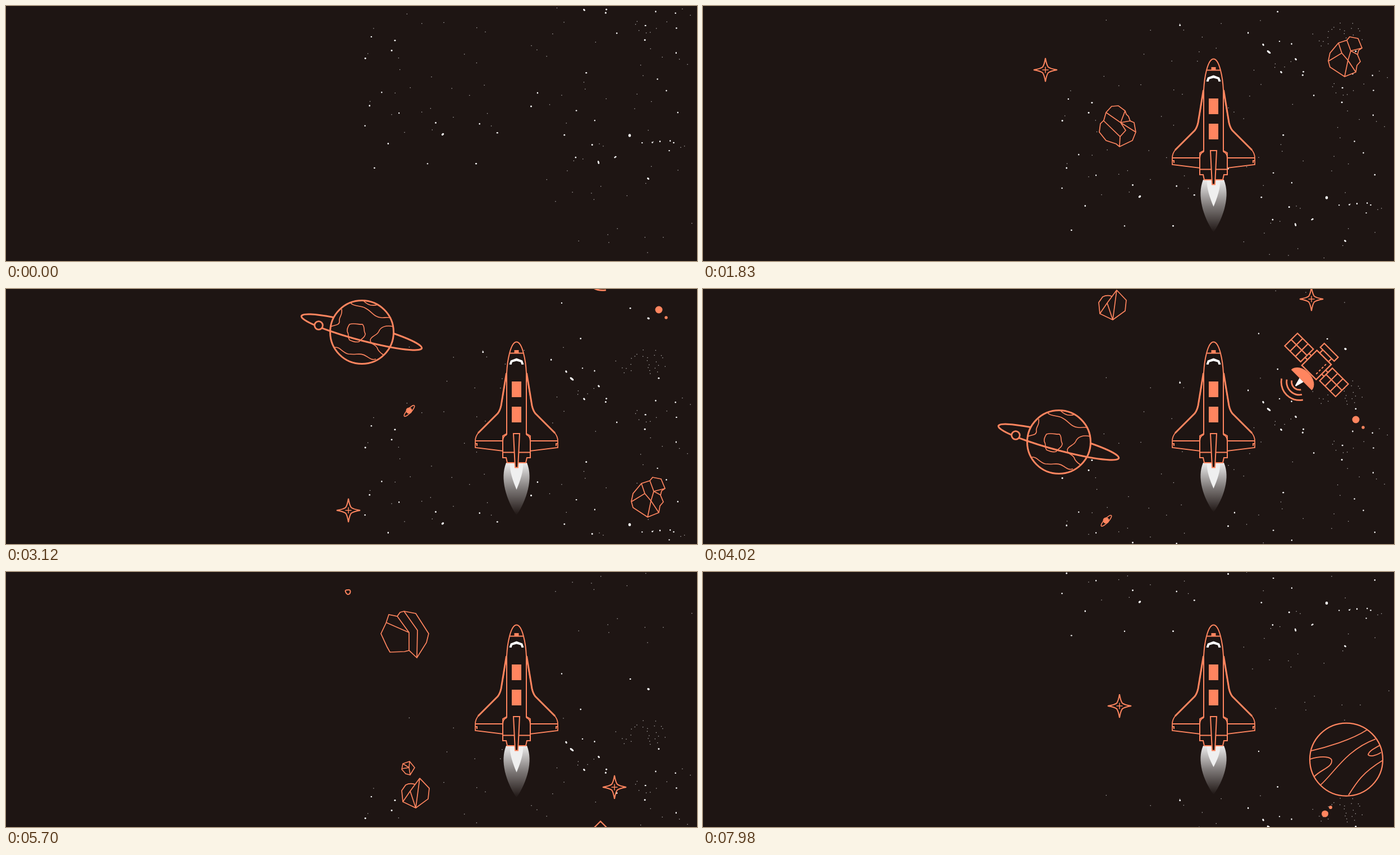
Animation of 1231 by 455 pixels, one loop 8 s. Source, as an HTML page with a canvas:

```html
<!DOCTYPE html>
<html lang="en">
<head>
<meta charset="utf-8">
<title>Shuttle flight</title>
<style>
html, body { margin: 0; width: 100%; height: 100%; overflow: hidden; background: #1e1513; }
canvas { display: block; }
</style>
</head>
<body>
<canvas id="stage" width="1231" height="455"></canvas>
<script>
const ctx = document.getElementById('stage').getContext('2d');
const W = 1231, H = 455, LOOP = 8000, STEP = 30;
const BG = '#1e1513', INK = '#ff855f';
const STAR_SPEED = 0.0607, SPEED = 0.2178, TILE = 660;
const TAU = Math.PI * 2, DEG = Math.PI / 180;

function seeded(seed) {
  return () => (seed = seed * 16807 % 2147483647) / 2147483647;
}

// Star regions of the scrolling tile
const rand = seeded(4217);
const stars = [];
function scatter(count, left, right, top, bottom, bright) {
  for (let i = 0; i < count; i++) {
    const x = left + (right - left) * rand();
    const y = top + (bottom - top) * rand();
    const w = bright ? 2.2 + rand() : 1.5;
    stars.push({ x, y, w, h: bright ? 2.2 + rand() : 1.5, turn: 0, alpha: bright ? 1 : .7 });
  }
}
scatter(26, 640, 900, 0, 245, false);
scatter(58, 930, 1225, 0, 440, false);
scatter(26, 1085, 1175, -82, -38, false);
scatter(16, 670, 1090, -100, 0, false);
scatter(15, 637, 885, 10, 310, true);
scatter(28, 930, 1222, 0, 275, true);
scatter(8, 820, 1225, -190, -5, true);

// The largest stars: x, y, width, height, angle
for (const [x, y, w, h, turn] of [
  [778, 229, 5, 3.5, -40], [1055.5, 279, 3, 6, -15], [1111, 231, 4.5, 5.5, 0],
  [1144, 308, 4.5, 3, 40], [1030, 7, 4.5, 3, 50], [998, -42, 4.5, 3, 60],
  [1008, -29, 8, 3.5, 40], [1056, -16, 4.5, 3, 50], [1144.5, -137, 4.5, 3.5, 20]
]) stars.push({ x, y, w, h, turn, alpha: 1 });

function starField(shift) {
  for (const { x, y, w, h, turn, alpha } of stars) {
    ctx.fillStyle = `rgba(255,255,255,${alpha})`;
    ctx.beginPath();
    ctx.ellipse(x, (y + shift + TILE + 10) % TILE - 10, w / 2, h / 2, turn * DEG, 0, TAU);
    ctx.fill();
  }
}

function line(d, width = 1.7, fill) {
  const path = new Path2D(d);
  if (fill) { ctx.fillStyle = fill; ctx.fill(path); }
  ctx.strokeStyle = INK;
  ctx.lineWidth = width;
  ctx.stroke(path);
}

function shape(d, fill) {
  ctx.fillStyle = fill;
  ctx.fill(new Path2D(d));
}

function disc(x, y, r, fill = INK) {
  ctx.fillStyle = fill;
  ctx.beginPath();
  ctx.arc(x, y, r, 0, TAU);
  ctx.fill();
}

function arc(x, y, rx, ry, width, turn = 0, from = 0, to = 360) {
  ctx.strokeStyle = INK;
  ctx.lineWidth = width;
  ctx.beginPath();
  ctx.ellipse(x, y, rx, ry, turn * DEG, from * DEG, to * DEG);
  ctx.stroke();
}

function sparkle(x, y) {
  ctx.save();
  ctx.translate(x, y);
  ctx.beginPath();
  for (let i = 0; i < 4; i++) {
    ctx.lineTo(0, -21);
    ctx.quadraticCurveTo(2, -9, 5, -5);
    ctx.quadraticCurveTo(9, -2, 21, 0);
    ctx.rotate(90 * DEG);
  }
  ctx.closePath();
  ctx.fillStyle = BG;
  ctx.fill();
  ctx.strokeStyle = INK;
  ctx.lineWidth = 2;
  ctx.stroke();
  line('M-5.5 0H5.5M0-5.5V5.5', 1.5);
  ctx.restore();
}

function firstRocks() {
  sparkle(610, 114);
  line('M728 179L740 178 752 187 754 193 758 197 761 205 768 208 771 225 765 240 742 251 736 246 718 240 706 225 708 210 714 204 718 190Z'
    + 'M718 190L744 208 753 222 743 233 714 205M743 233L742 251M752 187L744 208 761 205M744 208L771 225', 1.7, BG);
  line('M1152 55L1167 58 1174 75 1168 79 1166 87 1171 99 1165 106 1163 118 1143 126 1117 109 1114 98 1117 84 1132 66 1147 61Z'
    + 'M1132 66L1138 84 1115 98M1138 84L1149 97 1143 126M1163 118L1149 97 1154 80 1147 61M1174 75L1154 80 1167 87', 1.7, BG);
}

function ringedPlanet() {
  disc(634, 77, 56.5, BG);
  line('M598 36C600 48 592 50 594 58C594 65 586 64 579 67'
    + 'M614 25C620 32 632 29 640 34C652 40 655 50 668 51C675 52 680 49 686 52'
    + 'M637 21C645 30 655 30 662 28'
    + 'M612 63C620 60 630 64 635 63C640 68 636 73 640 80C640 87 633 88 629 94C622 96 616 93 612 91C608 86 612 82 608 76C607 70 610 66 612 63Z'
    + 'M690 67C676 64 667 68 664 76C661 83 650 84 649 91C649 100 660 98 662 107C665 113 669 115 673 118'
    + 'M585 104C596 103 598 113 610 116C625 118 632 113 642 120C650 125 652 127 659 125', 1.6);
  arc(634, 77, 56.5, 56.5, 3);
  arc(633.5, 77, 111, 14.5, 3, 15, -60, 240);
  disc(557, 65, 7.5, BG);
  arc(557, 65, 7.3, 7.3, 2.8);
  disc(718, 217, 5.5);
  arc(718.5, 217.5, 13, 3.6, 1.6, -47);
  disc(1163, 37, 6.5);
  disc(1176, 51, 2.7);
}

function satellite() {
  ctx.save();
  ctx.translate(1093, 135.5);
  ctx.rotate(45 * DEG);
  for (const x of [-64, 24])
    line(`M${x}-16h40v32h-40zM${x} 0h40M${x + 13.3}-16v32M${x + 26.6}-16v32`, 2.2, BG);
  line('M-18-19H18V19H-18Z', 2.4, BG);
  line('M-17.5-37h35v10h-35zM-11-27v8M11-27v8M-24-5h6M-24 5h6M18-5h6M18 5h6', 2.2);
  ctx.setLineDash([4, 3]);
  line('M11-13V13', 2);
  ctx.setLineDash([]);
  for (const r of [14, 23, 32.5]) arc(0, 43, r, r, 2.8, 0, 34, 146);
  shape('M-26 38A26 18 0 0 1 26 38Z', INK);
  shape('M-5 38H5L1 53H-1Z', '#fff');
  ctx.restore();
}

function middleGroup() {
  satellite();
  sparkle(1084, 18);
  line('M737 2L754 20 752 39 730 55 707 44 705 24 712 14Q720 10 728 13M707 44L720 25 737 2 730 55 720 25', 1.7, BG);
}

function lateRocks() {
  line('M709 70L730 74 753 110 749 126 732 153 718 140 710 142 684 143 679 134 668 110 677 91 682 76 697 79 702 72Z'
    + 'M677 90L718 108V140M697 79L718 108M709 70L733 104 732 153', 1.7, BG);
  line('M719 338L728 349 720 362 712 360 705 352 707 342ZM707 342L718 349 719 338M705 351L718 349 720 362', 1.6, BG);
  line('M604.5 34Q605 31.5 609 32Q613.5 31 613.5 35Q613 40 609 40Q606 39 604.5 34Z', 2);
}

function stripedPlanet() {
  sparkle(742, 30);
  disc(1146, 125.5, 65, BG);
  line('M1083 110C1110 104 1155 91 1184 72'
    + 'M1100 171C1124 150 1146 108 1198 89'
    + 'M1150 189C1165 165 1175 149 1211 127'
    + 'M1081 125C1100 119 1122 119 1120 129C1119 140 1100 144 1089 156'
    + 'M1206 100C1195 106 1186 111 1185 117C1188 121 1198 119 1208 113', 1.8);
  arc(1146, 125.5, 65, 65, 2.2);
  disc(1108, 222.5, 6);
  disc(1118, 211, 3);
}

// Each group is drawn as it stands at time "at"
const GROUPS = [
  { at: 1830, draw: firstRocks },
  { at: 3120, draw: ringedPlanet },
  { at: 4020, draw: middleGroup },
  { at: 5700, draw: lateRocks },
  { at: 7020, draw: stripedPlanet }
];

function tongue(top, bulge, low, height, fill) {
  ctx.save();
  ctx.translate(909.5, 310);
  ctx.scale(1, height);
  ctx.fillStyle = fill;
  ctx.beginPath();
  ctx.moveTo(-top, 0);
  ctx.bezierCurveTo(-bulge, .3, -low, .7, 0, 1);
  ctx.bezierCurveTo(low, .7, bulge, .3, top, 0);
  ctx.fill();
  ctx.restore();
}

function flame(t) {
  const q = (t - 1830) / 431.6 * Math.PI;
  const glow = ctx.createLinearGradient(0, 0, 0, 1);
  glow.addColorStop(0, 'rgba(255,255,255,.92)');
  glow.addColorStop(.5, 'rgba(255,255,255,.42)');
  glow.addColorStop(1, 'rgba(255,255,255,0)');
  tongue(18.5, 30, 18.5, 94 - 13 * Math.sin(3 * q) ** 2, glow);
  tongue(11.5, 13, 6, 48 - 10 * Math.sin(2 * q) ** 2, '#efefef');
}

function wing() {
  line('M892 149L882 209Q880 217 876 222L842 256Q836 263 836 271V283L885 289V262L892 258Z', 1.8, BG);
  line('M891.5 150L882 208Q880 217 876 222L841 257', 3);
  line('M836 271H885M836 276H839V280', 2);
}

function shuttle() {
  wing();
  ctx.save();
  ctx.translate(1819, 0);
  ctx.scale(-1, 1);
  wing();
  ctx.restore();
  line('M892 262V150C893 128 899 94.5 909.5 94.5C920 94.5 926 128 927 150V262Z', 2, BG);
  line('M892 260Q885 262 885 272V301H891L893 310H926L928 301H934V272Q934 262 927 260', 2, BG);
  line('M898 114.5H921M885 291.5H934', 1.8);
  line('M904 258H915L912 318.5H907Z', 2, BG);
  ctx.fillStyle = INK;
  ctx.fillRect(905.5, 109, 8, 5);
  for (const y of [165, 210]) ctx.fillRect(901, y, 17, 28);
  shape('M896.5 134.5L899 127.5 909.5 123.5 920 127.5 922.5 134.5 918.5 135 917 130.5 909.5 128.5 902 130.5 900.5 135Z', '#fff');
}

function render(t) {
  ctx.miterLimit = 2;
  ctx.fillStyle = BG;
  ctx.fillRect(0, 0, W, H);
  starField(t * STAR_SPEED);
  for (const { at, draw } of GROUPS) {
    ctx.save();
    ctx.translate(0, SPEED * (t - at));
    draw();
    ctx.restore();
  }
  const p = Math.min(1, t / 1500);
  ctx.save();
  ctx.translate(0, 365 * (1 - p * p * (3 - 2 * p)));
  flame(t);
  shuttle();
  ctx.restore();
}

const start = performance.now();
function tick() {
  const t = (performance.now() - start) % LOOP;
  render(Math.floor(t / STEP) * STEP);
  requestAnimationFrame(tick);
}
tick();
</script>
</body>
</html>
```
